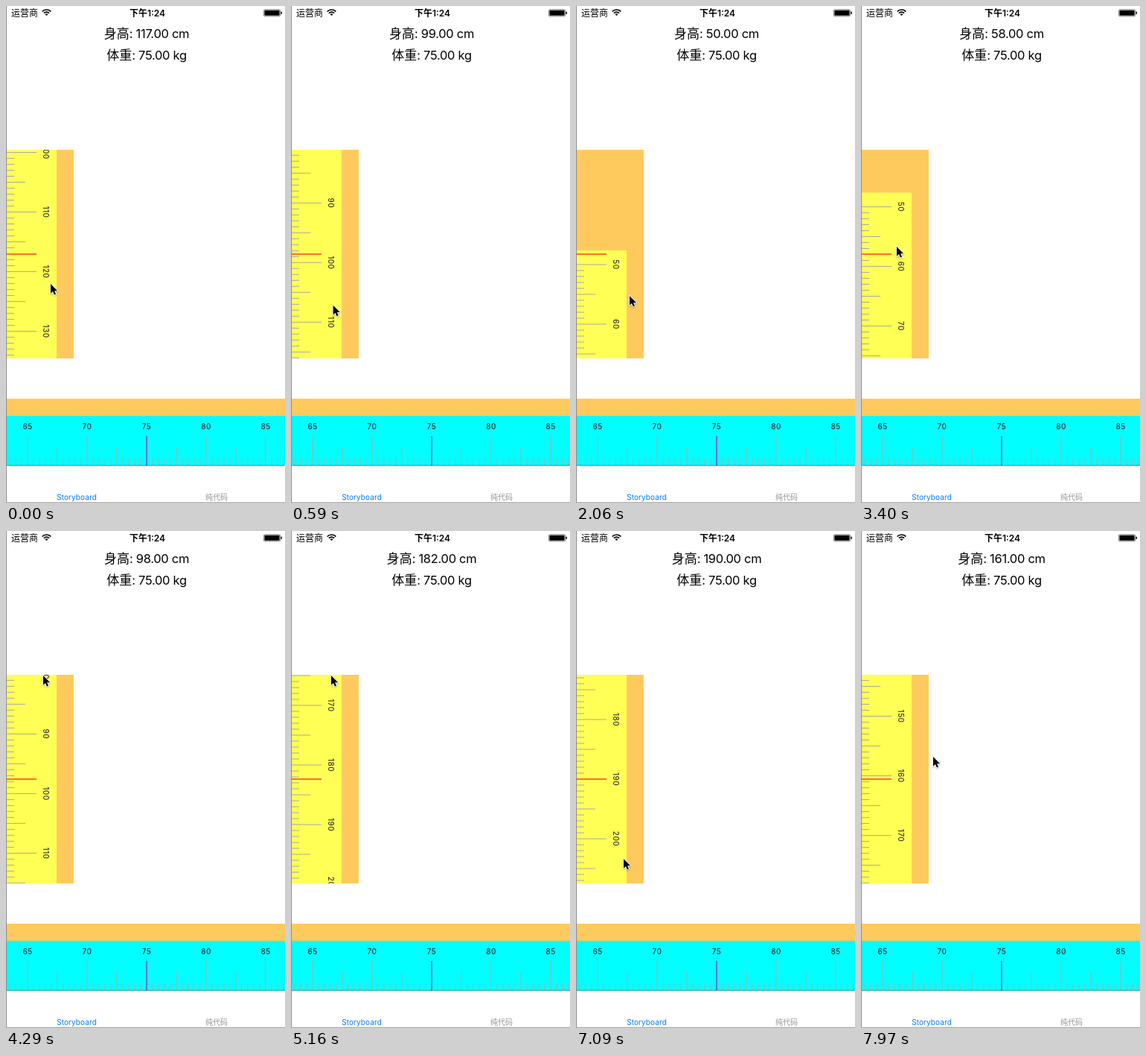
An HTML page with a canvas for the animation above (8000 ms loop, 375x667 px).

```html
<!DOCTYPE html>
<html lang="zh">
<head>
<meta charset="utf-8">
<title>Ruler picker</title>
<style>
  html, body { margin: 0; width: 100%; height: 100%; overflow: hidden; background: #fff; }
  canvas { display: block; width: 375px; height: 667px; }
</style>
</head>
<body>
<canvas id="stage"></canvas>
<script>
const W = 375, H = 667, LOOP = 8000, STEP = 147.6;
const SANS = 'Inter, "Noto Sans CJK SC", "Noto Sans CJK", sans-serif';
const CJK = '"Noto Sans CJK SC", "Noto Sans CJK", sans-serif';
const ORANGE = '#ffca5d', YELLOW = '#ffff55', CYAN = '#00ffff', TICK = '#aaa';
const GAP = 8, MIN = 50, MAX = 220, PAD = 19;

const canvas = document.getElementById('stage');
const ctx = canvas.getContext('2d');
const dpr = window.devicePixelRatio || 1;
canvas.width = W * dpr;
canvas.height = H * dpr;
ctx.scale(dpr, dpr);

const mix = (a, b, k) => a + (b - a) * k;
const clamp = (v, lo, hi) => Math.min(hi, Math.max(lo, v));

// A drag moves the ruler with the pointer and ends at `value`;
// between drags the pointer travels while the ruler coasts.
const drag = (start, end, x, y0, y1, value) => ({ start, end, x, y0, y1, value });
const hold = (start, end, x, y, value) => drag(start, end, x, y, y, value);
const swipeUp = k => drag(27 + 3 * k, 29 + 3 * k, 50 + 2 * k, 400, 194, 97.575 + 42.4 * k);

const gestures = [
  drag(0, 2, 60, 373, 440, 108.69),
  drag(8, 10, 50, 325, 489, 70),
  hold(10, 11, 50, 489, 70),
  drag(13, 14, 72, 340, 389, 48.25),
  hold(18, 22, 48, 387, 50),
  drag(22, 24, 48, 387, 259, 65.94),
  hold(24, 25, 48, 259, 65.94),
  ...[0, 1, 2].map(swipeUp),
  drag(37, 39, 58, 430, 270, 218),
  hold(42, 42, 66, 282, 220),
  hold(44, 45, 62, 200, 220),
  drag(45, 48, 64, 200, 440, 190),
  hold(48, 49, 64, 440, 190),
  drag(51, 54, 97, 200, 303, 160.56)
];

function dragPose(g, step) {
  const k = g.end > g.start ? clamp((step - g.start) / (g.end - g.start), 0, 1) : 1;
  const y = mix(g.y0, g.y1, k);
  return { x: g.x, y, value: g.value + (g.y1 - y) / GAP };
}

function poseAt(step) {
  const i = gestures.findLastIndex(g => g.start <= step);
  const now = gestures[i], next = gestures[i + 1];
  const a = dragPose(now, step);
  if (step <= now.end || !next) return a;
  const b = dragPose(next, next.start);
  const k = (step - now.end) / (next.start - now.end);
  return {
    x: mix(a.x, b.x, k),
    y: mix(a.y, b.y, k),
    value: mix(a.value, b.value, 1 - (1 - k) ** 2)
  };
}

function rect(color, x, y, w, h) {
  ctx.fillStyle = color;
  ctx.fillRect(x, y, w, h);
}

function text(str, x, y, font, color = '#000', align = 'center', spacing = 0) {
  ctx.font = font;
  ctx.letterSpacing = spacing + 'px';
  ctx.textAlign = align;
  ctx.fillStyle = color;
  ctx.fillText(str, x, y);
}

const tickLength = n => n % 10 === 0 ? 40 : n % 5 === 0 ? 25 : 10;
const tickLabel = (v, x, y) => text(v, x, y, '500 10px ' + SANS, '#333', 'center', 0.4);

function reading(name, value, unit, baseline) {
  const rest = `: ${value.toFixed(2)} ${unit}`;
  const font = '16.5px ' + SANS, spacing = -0.3;
  ctx.font = font;
  ctx.letterSpacing = spacing + 'px';
  const left = 189 - (34 + ctx.measureText(rest).width) / 2;
  text(name, left, baseline, '17px ' + CJK, '#000', 'left');
  text(rest, left + 34, baseline, font, '#000', 'left', spacing);
}

function wifi(x, y) {
  const from = -Math.PI * 0.76, to = -Math.PI * 0.24;
  ctx.strokeStyle = ctx.fillStyle = '#000';
  ctx.lineWidth = 1.7;
  for (const r of [8, 4.9]) {
    ctx.beginPath();
    ctx.arc(x, y, r, from, to);
    ctx.stroke();
  }
  ctx.beginPath();
  ctx.moveTo(x, y);
  ctx.arc(x, y, 2.7, from, to);
  ctx.fill();
}

function roundBox(x, y, w, h, r, paint) {
  ctx.beginPath();
  ctx.roundRect(x, y, w, h, r);
  ctx[paint]();
}

function statusBar() {
  text('运营商', 7, 13.5, '12px ' + CJK, '#000', 'left');
  text('下午1:24', 190, 13.5, '600 12px ' + SANS);
  wifi(54.5, 13);
  ctx.lineWidth = 0.5;
  roundBox(346.3, 4.8, 22.4, 9, 1.8, 'stroke');
  roundBox(347.4, 5.8, 20.2, 7, 1, 'fill');
  roundBox(369.4, 7.6, 1.5, 3.4, 0.7, 'fill');
}

function heightRuler(value) {
  const yOf = v => 333 + (v - value) * GAP;
  ctx.save();
  ctx.beginPath();
  ctx.rect(1, 193, 90, 280);
  ctx.clip();
  rect(ORANGE, 1, 193, 90, 280);
  rect(YELLOW, 1, yOf(MIN) - PAD, 67, (MAX - MIN) * GAP + 2 * PAD);
  for (let v = MIN; v <= MAX; v++) {
    const y = yOf(v);
    rect(TICK, 1, y - 0.5, tickLength(v), 1);
    if (v % 10 === 0) {
      ctx.save();
      ctx.translate(50, y);
      ctx.rotate(Math.PI / 2);
      tickLabel(v, 0, 0);
      ctx.restore();
    }
  }
  rect('#ff7030', 1, 332, 40, 2);
  ctx.restore();
}

// Ten marks span five kilograms
function weightRuler(value) {
  rect(ORANGE, 1, 527, 374, 23);
  rect(CYAN, 1, 550, 374, 67);
  for (let n = -23; n <= 23; n++) {
    const x = 189 + n * GAP, len = tickLength(n);
    rect(TICK, x - 0.5, 617 - len, 1, len);
    if (n % 10 === 0) tickLabel(value + n / 2, x, 568);
  }
  rect('#7070c8', 188, 577, 2, 40);
}

function tabBar() {
  rect('rgba(0,0,0,.3)', 1, 616, 374, 1);
  text('Storyboard', 95, 662.5, '10px ' + SANS, '#007aff', 'center', 0.1);
  text('纯代码', 283, 662.5, '10px ' + CJK, '#929292');
}

function windowEdge() {
  rect('#8c8c8c', 0, 0, 1, H);
  rect('#a0a0a0', 0, 666, W, 1);
}

const arrow = new Path2D('M0 0V14.2L3.3 11.2L5.5 16.2L7.8 15.2L5.7 10.3H10.2Z');

function pointer(x, y) {
  ctx.save();
  ctx.translate(x, y);
  ctx.scale(0.9, 0.9);
  ctx.lineJoin = 'round';
  ctx.shadowColor = 'rgba(0,0,0,.3)';
  ctx.shadowBlur = 2 * dpr;
  ctx.shadowOffsetY = dpr;
  ctx.strokeStyle = '#fff';
  ctx.lineWidth = 2;
  ctx.stroke(arrow);
  ctx.shadowColor = 'transparent';
  ctx.fillStyle = '#000';
  ctx.fill(arrow);
  ctx.restore();
}

function draw(ms) {
  const { x, y, value } = poseAt(Math.floor((ms % LOOP + 8) / STEP));
  rect('#fff', 0, 0, W, H);
  statusBar();
  reading('身高', Math.round(clamp(value, MIN, MAX)), 'cm', 43);
  reading('体重', 75, 'kg', 71.5);
  heightRuler(value);
  weightRuler(75);
  tabBar();
  windowEdge();
  pointer(x, y);
}

const start = performance.now();
function tick() {
  draw(Math.max(0, performance.now() - start));
  requestAnimationFrame(tick);
}
tick();
</script>
</body>
</html>
```
